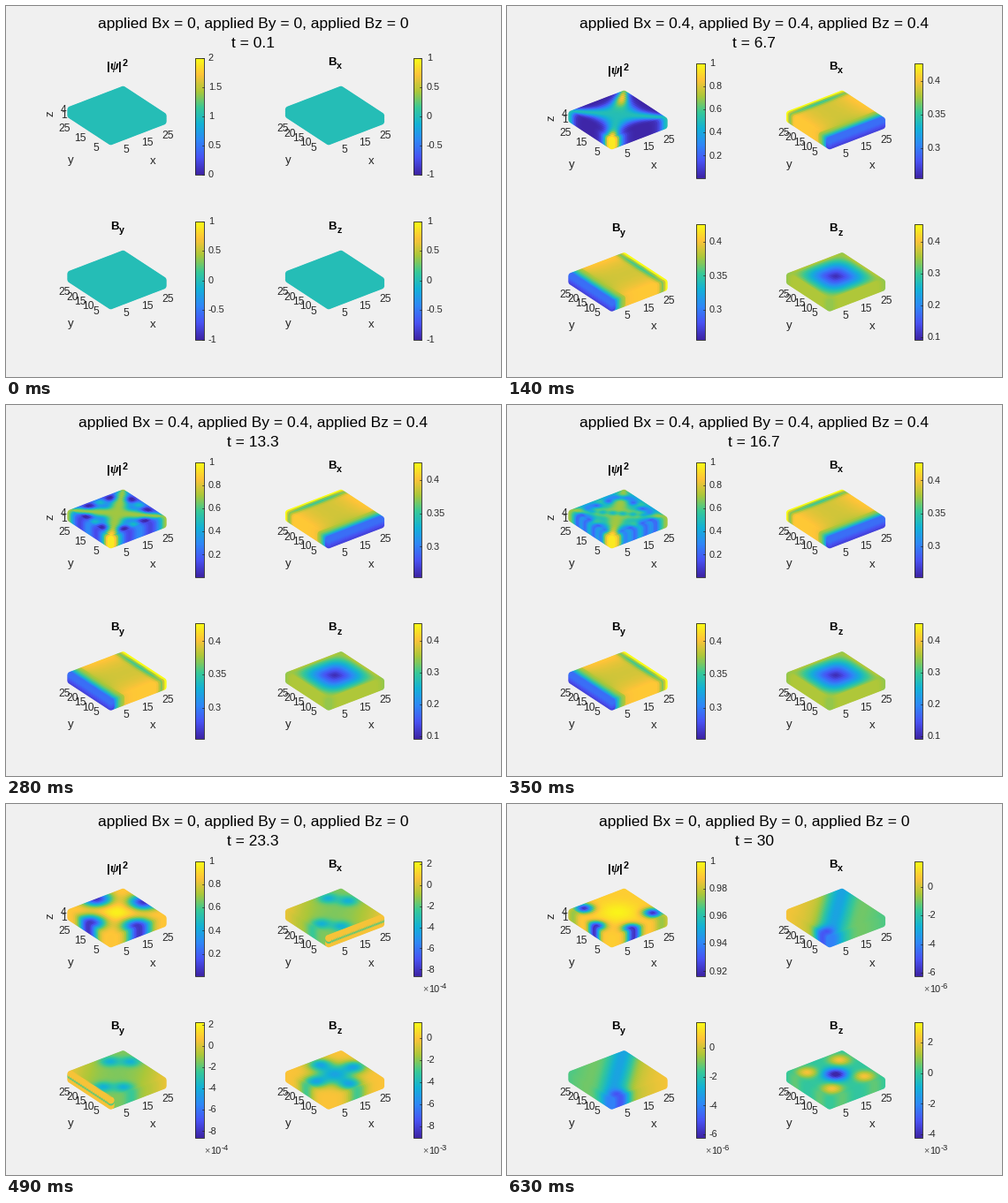
These frames come from a looping animation (560 by 420 pixels, 700 ms). A matplotlib script:

```python
import numpy as np
import matplotlib.pyplot as plt
from matplotlib.animation import FuncAnimation
from matplotlib.colors import LinearSegmentedColormap
from matplotlib.patches import Rectangle

W, H, DPI = 560, 420, 100
STEPS, FIELD_OFF = 10, 7
INK = "#262626"
plt.rcParams["font.family"] = "Liberation Sans"

PARULA = LinearSegmentedColormap.from_list("parula", [
    "#3e26a8", "#4852f4", "#2e87f7", "#12b1d6", "#37c897", "#abc739", "#fec338", "#f9fb15"])
TIMES = np.linspace(1, 300, STEPS).astype(int) / 10

# Grid of the slab, sorted from back to front
N = 27
I, J, K = (a.ravel() for a in np.mgrid[0:N, 0:N, 0:4])
order = np.argsort(-.527 * I - .687 * J + .5 * K, kind="stable")
I, J, K = I[order], J[order], K[order]
U, V = I / 13 - 1, J / 13 - 1
SX = 118.6 + 2.27 * I - 1.74 * J
SY = 153.3 - .87 * I - 1.14 * J - 2.1 * K


def bump(u, v, s):
    return np.exp(-((U - u) ** 2 + (V - v) ** 2) / s ** 2)


def pair(u, v, s):
    """Two bumps mirrored in the diagonal."""
    return bump(u, v, s) + bump(v, u, s)


def edges(d, s):
    return pair(d, 0, s) + pair(-d, 0, s)


def corners(d, s):
    return bump(d, d, s) + bump(-d, -d, s) + pair(d, -d, s)


def mix(f, g, w):
    return (1 - w) * f + w * g


# Order parameter
def star_ridge(k):
    return np.exp(-k * (U ** 2 - V ** 2) ** 2)


def psi_star(k):
    return star_ridge(k) * (.5 + .36 * bump(.7, .7, .5)) + .45 * bump(-1, -1, .35)


def psi_entry():
    r = star_ridge(9)
    speckle = .2 + .28 * np.cos(7.5 * U) * np.cos(7.5 * V)
    return .7 * r + (1 - r) * speckle + .25 * bump(-1, -1, .35)


def psi_vortices():
    f = .7 + .25 * bump(-1, -1, .4)
    for t in np.linspace(-.6, .6, 4):
        f = f - .55 * (pair(t, .75, .14) + pair(t, -.95, .14))
    for t in np.linspace(-.55, .55, 6):
        f = f - .5 * bump(t, -t, .13)
    return f


def psi_recover():
    return 1 - .12 * np.abs(U * V) - .95 * edges(1.02, .46)


def psi_relaxed():
    return .88 + .1 * bump(0, 0, .6) - .85 * (pair(-.67, .82, .27) + pair(-1.03, -.25, .27))


# In-plane field: a runs along the screened direction, b across it
def b_applied(a, b):
    rise = .68 * (1 - np.exp(-(a + 1) / .16))
    rim = .3 * np.exp(-(1 - a) / .05) - .22 * np.exp(-((a - .86) / .13) ** 2)
    return .1 + .04 * K * (a < -.99) + rise + rim + .09 * b ** 2 * (a > -.6)


def b_decay(a, b):
    f = .66 + .16 * ((b - a) / 2) ** 2
    for s in (-1, 1):
        for p, q in ((.75, .3), (.35, .8)):
            f = f - .24 * np.exp(-((b - s * p) ** 2 + (a - s * q) ** 2) / .08)
    return np.where(a < -.99, np.where(K == 2, .62, .84), f)


def b_relaxed(a, b):
    f = .72 + .06 * (a - b) - .34 * np.exp(-((a - b) / .6) ** 2)
    return f - .3 * np.exp(-((b + 1) ** 2 + (a + .7) ** 2) / .09)


# Out-of-plane field
def bz_applied():
    r = (np.abs(U) ** 3 + np.abs(V) ** 3) ** (1 / 3)
    return .02 + .7 * r ** 1.25 - .27 * np.abs(U * V) ** 3


def bz_decay():
    return .85 - .45 * bump(0, 0, .5) - .42 * edges(.75, .36)


def bz_relaxed():
    return .55 - .6 * bump(0, 0, .35) + .3 * corners(.62, .32)


def fields(n):
    """Normalised colour values of the four slabs."""
    if n == 0:
        return [np.full(U.shape, .5)] * 4
    if n < FIELD_OFF:
        keys = psi_star(4 + min(n, 2)), psi_entry(), psi_vortices()
        i, part = divmod(max(n - 2, 0) / 2, 1)
        psi = mix(keys[int(i)], keys[min(int(i) + 1, 2)], part)
        return [psi, b_applied(V, U), b_applied(U, V), bz_applied()]
    w = (n - FIELD_OFF) / 2
    return [mix(psi_recover(), psi_relaxed(), w),
            mix(b_decay(V, U), b_relaxed(V, U), w),
            mix(b_decay(U, V), b_relaxed(U, V), w),
            mix(bz_decay(), bz_relaxed(), w)]


def scales(n):
    """Colour limits and power of ten of the four slabs."""
    if n == 0:
        return [(0, 2, 0)] + [(-1, 1, 0)] * 3
    if n < FIELD_OFF:
        s = .5 ** (n - 1)
        plane = (.254 + .0045 * s, .428 - .003 * s, 0)
        return [(.008, 1, 0), plane, plane, (.093, .457, 0)]
    k = n - FIELD_OFF
    plane = (1.2 * k - 8.6, 2.3 - .25 * k, -4 - k)
    return [(1 - .99 * .29 ** k, 1, 0), plane, plane, (2.4 * k - 9, 1.47 + .95 * k, -3)]


def nice_step(span):
    """Smallest step of 1, 2 or 5 that gives at most six intervals."""
    return next(m * 10.0 ** e for e in range(-3, 2) for m in (1, 2, 5)
                if span / (m * 10.0 ** e) <= 6)


fig = plt.figure(figsize=(W / DPI, H / DPI), dpi=DPI, facecolor="#f0f0f0")
ax = fig.add_axes([0, 0, 1, 1])


def put(x, y, s, px, ha="center", color=INK, **kw):
    """Text with its digits centred on y."""
    ax.text(x, y + .36 * px - .7, s, fontsize=px * 72 / DPI, ha=ha, va="baseline",
            color=color, **kw)


def colorbar(x, width, top, bottom, scale):
    lo, hi, power = scale
    ax.pcolormesh([x, x + width], np.linspace(bottom, top, 129),
                  np.linspace(0, 1, 128)[:, None], cmap=PARULA, zorder=1)
    ax.add_patch(Rectangle((x, top), width, bottom - top, fill=False, ec=INK, lw=.6, zorder=2))
    step = nice_step(hi - lo)
    first, last = np.ceil(lo / step - 1e-6), np.floor(hi / step + 1e-6)
    for v in np.arange(first, last + 1) * step:
        y = bottom - (v - lo) / (hi - lo) * (bottom - top)
        ax.plot([x + width - 1.6, x + width], [y, y], color=INK, lw=.5, zorder=2)
        put(x + 15.3, y, f"{round(v, 6) + 0:g}", 10.9, "left")
    if power:
        put(x + 10.5, bottom + 15, "×", 10.7, "left", "#555555")
        put(x + 18, bottom + 15, "10", 10.9, "left")
        put(x + 30, bottom + 11.5, str(power), 9.3, "left")


def heading(k, x, y):
    bold = dict(weight="bold", color="black")
    if k == 0:
        put(115.5, y + 5, "|", 13.2, **bold)
        put(122, y + 5, "ψ", 14.5, family="Liberation Serif", style="italic", **bold)
        put(128.5, y + 5, "|", 13.2, **bold)
        put(134.7, y + 2, "2", 10.6, **bold)
    else:
        put(x + 117.7, y, "B", 13.2, "left", **bold)
        put(x + 127.8, y + 5.2, "xyz"[k - 1], 10.6, "left", **bold)


def axis_text(k, x, y):
    for v in range(25, 0, -10 if k == 0 else -5):
        put(x + 110.5 - 1.77 * v, y + 165.5 - 1.08 * v, str(v), 12)
    for v in (5, 15, 25):
        put(x + 124.5 + 2.33 * v, y + 166.8 - .82 * v, str(v), 12)
    put(x + 73, y + 173.5, "y", 13.2)
    put(x + 166.3, y + 175, "x", 13.2)
    if k == 0:
        put(65.3, y + 117, "4", 12)
        put(65.3, y + 123.5, "1", 12)
        ax.text(51, y + 121.5, "z", fontsize=13.2 * 72 / DPI, rotation=90,
                ha="center", va="center", color=INK)


def draw(n):
    ax.clear()
    ax.set_axis_off()
    field = .4 if 0 < n < FIELD_OFF else 0
    put(279.7, 19.5, ", ".join(f"applied B{c} = {field:g}" for c in "xyz"), 17.33,
        color="black")
    put(279.7, 41.5, f"t = {TIMES[n]:g}", 17.33, color="black")

    # The layout settles a few pixels lower once the field is on
    g, h = 1 - .1 ** n, min(n, 2) / 2
    shift = 5 * g, 2.4 * h
    bars = ((58.5 + round(6 * g), 190.5 + round(4 * g)), (243.5 + round(3 * h), 377.5))

    for k, (values, scale) in enumerate(zip(fields(n), scales(n))):
        row, col = divmod(k, 2)
        x, dy = 246.5 * col, shift[row]
        ax.scatter(SX + x, SY + 186 * row + dy, s=33, c=np.clip(values, 0, 1),
                   cmap=PARULA, vmin=0, vmax=1, linewidths=0, zorder=1)
        axis_text(k, x, 185 * row + dy)
        heading(k, x, 62.8 + 186 * row + dy)
        colorbar(213.5 + 247 * col, 10 - col, *bars[row], scale)

    ax.set_xlim(0, W)
    ax.set_ylim(H, 0)
    return []


anim = FuncAnimation(fig, draw, frames=STEPS, init_func=lambda: [], interval=70,
                     repeat=True, cache_frame_data=False)
plt.show()
```
